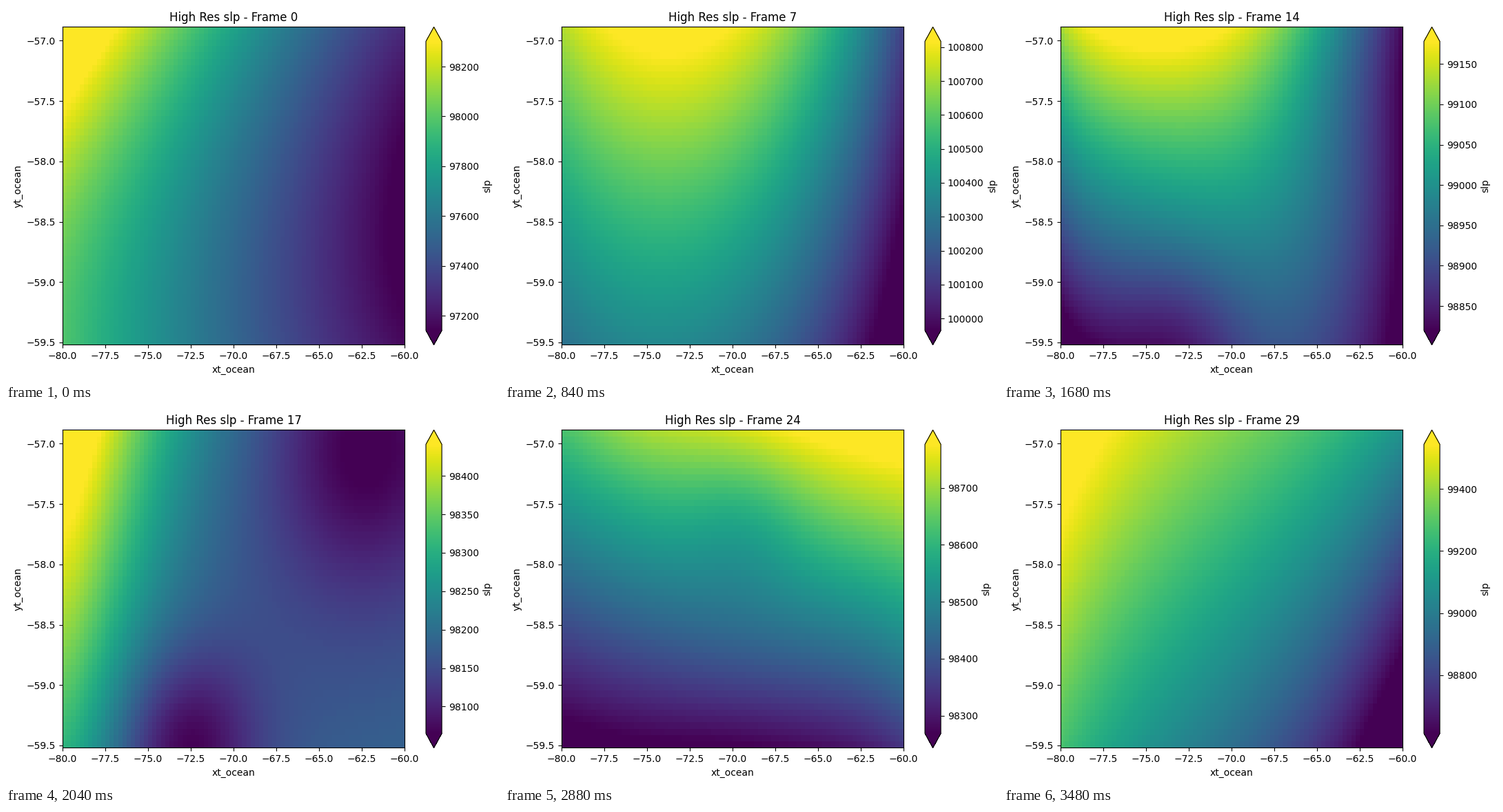
These frames come from a looping animation (715x545 px, 3600 ms). A matplotlib script:

```python
import numpy as np
import matplotlib.pyplot as plt
from matplotlib.animation import FuncAnimation

W, H, DPI = 715, 545, 100
FRAMES, INTERVAL = 30, 120
NX, NY = 80, 50
NORTH, SOUTH = -56.886, -59.52

# Cell centres: u runs west to east, v north to south, both 0..1.
u, v = np.meshgrid((np.arange(NX) + .5) / NX, (np.arange(NY) + .5) / NY)


def bump(cu, cv, su, sv):
    return np.exp(-((u - cu) / su) ** 2 - ((v - cv) / sv) ** 2)


def northwest_high():
    w = (1 - v) ** 2
    return (.73 + .49 * w - (.86 + .6 * w) * u + (.17 + .2 * w) * u**2
            - .28 * u**2 * v * (1 - v))


def southeast_slope():
    return (1.06 - .3 * v + .04 * v**2 - (.2 + .38 * v) * u
            - (.66 - .34 * v) * u**2)


def north_ridge():
    crest = 1.04 - .73 * v + .15 * v**2
    return crest - (2.5 - 1.2 * v + .5 * v**2) * (u - .47 - .09 * v) ** 2


def twin_lows():
    ramp = (1 - .54 * v) * np.exp(-(u / (.33 - .12 * v)) ** 1.5)
    lows = .32 * bump(.36, 1, .2, .3) + .28 * bump(.88, .05, .27, .45)
    return .24 + ramp - lows + .08 * u * v**2


def northeast_high():
    return .5 - .56 * v + (.98 - .56 * v) * u - .34 * u**2


def central_trough():
    return (1 - v + .42 * v * u**7 + .08 * bump(.2, 0, .16, .15)
            - .24 * bump(.54, .28, .18, .25) - .05 * bump(.48, 1, .2, .15))


def diagonal_slope():
    x = u - .5
    return .84 - .4 * v - .4 * x - .8 * x**3 - .3 * v * u**3


# Weather states: time step, pressure range in Pa, relative pressure.
STATES = [
    (0, 97141, 98301, northwest_high),
    (4, 100198, 101389, southeast_slope),
    (10, 99596, 100423, north_ridge),
    (17, 98065, 98441, twin_lows),
    (21, 98658, 99444, northeast_high),
    (26, 98001, 98349, central_trough),
    (29, 98613, 99543, diagonal_slope),
]


def robust(field):
    return np.percentile(field, [2, 98])


def pressure(lo, hi, shape):
    f = shape()
    q0, q1 = robust(f)
    return lo + (hi - lo) * (f - q0) / (q1 - q0)


STEPS = [s[0] for s in STATES]
FIELDS = [pressure(*s[1:]) for s in STATES]


def field_at(i):
    k = min(np.searchsorted(STEPS, i, side="right") - 1, len(STEPS) - 2)
    t = (i - STEPS[k]) / (STEPS[k + 1] - STEPS[k])
    return (1 - t) * FIELDS[k] + t * FIELDS[k + 1]


fig = plt.figure(figsize=(W / DPI, H / DPI), dpi=DPI)
ax = fig.add_axes([82 / W, 52.55 / H, 620 / W, 462 / H])
mesh = ax.pcolormesh(np.linspace(-80, -60, NX + 1),
                     np.linspace(NORTH, SOUTH, NY + 1),
                     FIELDS[0], cmap="viridis")
ax.set(xlim=(-80, -60), ylim=(SOUTH, NORTH),
       xlabel="xt_ocean", ylabel="yt_ocean")
mesh.set_clim(*robust(FIELDS[0]))
fig.colorbar(mesh, ax=ax, extend="both", label="slp")
title = ax.set_title("")


def update(i):
    p = field_at(i)
    mesh.set_array(p)
    mesh.set_clim(*robust(p))
    title.set_text(f"High Res slp - Frame {i}")
    return mesh, title


anim = FuncAnimation(fig, update, frames=FRAMES, interval=INTERVAL,
                     init_func=lambda: update(0), repeat=True,
                     repeat_delay=0, blit=False)
plt.show()
```
